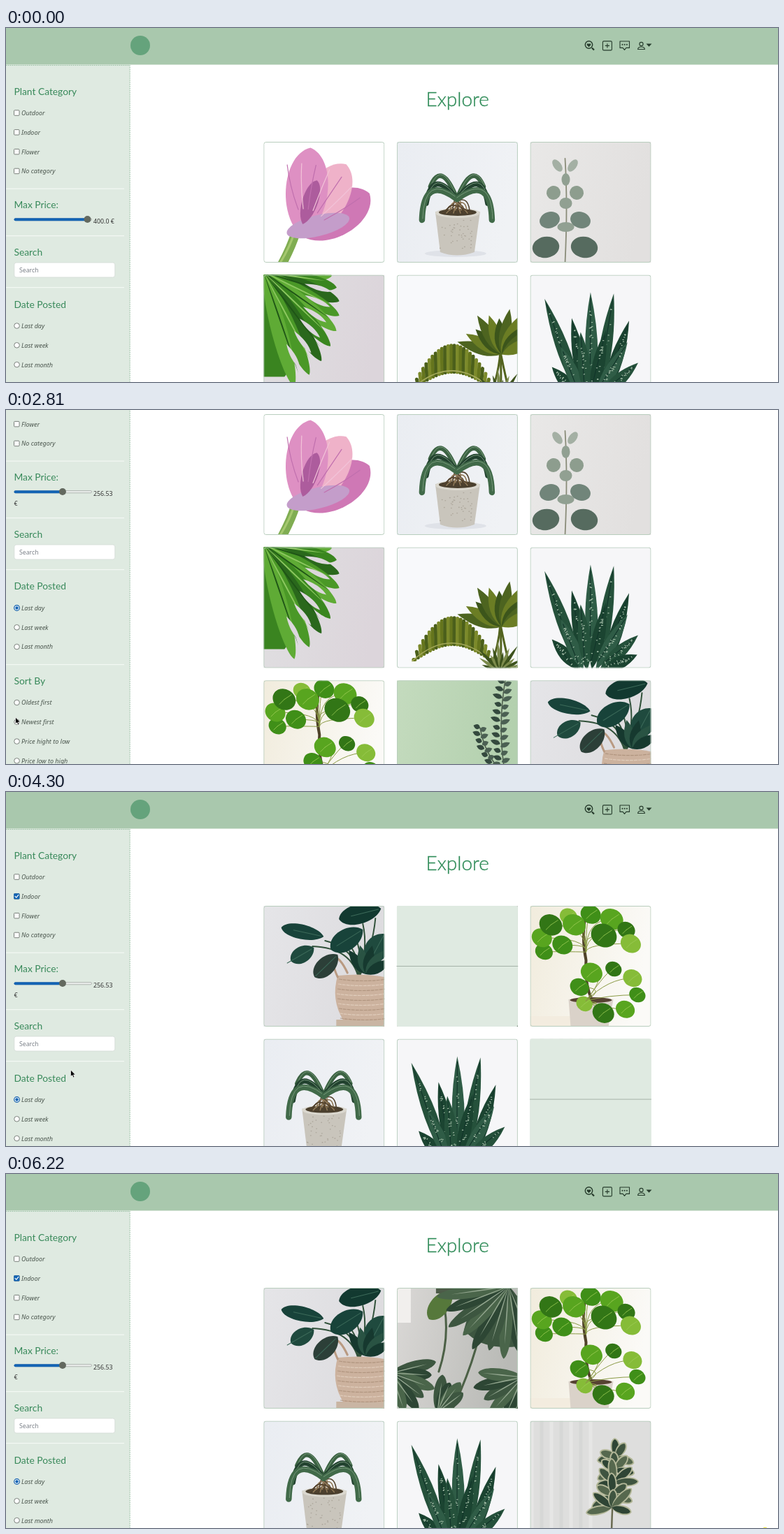
An HTML page that plays this animation: 1104x507 px, repeating every 6260 ms.

```html
<!DOCTYPE html>
<html lang="en">
<head>
<meta charset="utf-8">
<title>Explore plants</title>
<style>
html, body { margin: 0; height: 100%; overflow: hidden; background: #fff; }
#stage { display: block; width: 1104px; height: 507px; }
.h { font: 400 13.8px Lato, sans-serif; fill: #38895a; }
.title { font: 300 28px Lato, sans-serif; fill: #2e8b57; stroke: #2e8b57; stroke-width: .35px; text-anchor: middle; }
.label { font: italic 9px "Noto Sans", sans-serif; fill: #4a554d; }
.val { font: 8.8px "Noto Sans", sans-serif; fill: #333; }
.hint { font: 8.7px "Noto Sans", sans-serif; fill: #7b8088; }
.button { font: 8.7px "Noto Sans", sans-serif; fill: #38895a; text-anchor: middle; }
.card { font: 11.1px "Liberation Sans", Arial, sans-serif; fill: #38895a; text-anchor: middle; }
.icon { fill: none; stroke: #263b2c; stroke-width: 1.1; }
</style>
</head>
<body>
<svg id="stage" viewBox="0 0 1104 507"></svg>
<script>
const LOOP = 6260, WRAP = 14, SIZE = 173, PITCH = 190.6;
const PALE = '#dfeae1', BLUE = '#1464b4', GREEN = '#38895a';

// ---- drawing helpers: each returns SVG markup ----
const times = (n, fn) => Array.from({ length: n }, (_, i) => fn(i)).join('');
const each = (list, fn) => list.map(fn).join('');
const rect = (x, y, w, h, fill, more = '') => `<rect x="${x}" y="${y}" width="${w}" height="${h}" fill="${fill}" ${more}/>`;
const oval = (x, y, rx, ry, turn, fill) => `<ellipse rx="${rx}" ry="${ry}" fill="${fill}" transform="translate(${x} ${y}) rotate(${turn})"/>`;
const dot = (x, y, r, fill, more = '') => `<circle cx="${x}" cy="${y}" r="${r}" fill="${fill}" ${more}/>`;
const shape = (d, fill) => `<path d="${d}" fill="${fill}"/>`;
const line = (d, color, w = 1, more = '') => `<path d="${d}" fill="none" stroke="${color}" stroke-width="${w}" stroke-linecap="round" ${more}/>`;
const text = (x, y, cls, str) => `<text x="${x}" y="${y}" class="${cls}">${str}</text>`;
const place = (x, y, turn, body) => `<g transform="translate(${x} ${y}) rotate(${turn})">${body}</g>`;
const ground = fill => rect(0, 0, SIZE, SIZE, fill);
const fade = (id, a, b) => `<linearGradient id="${id}" x2="1" y2=".2"><stop stop-color="${a}"/><stop offset="1" stop-color="${b}"/></linearGradient>`;
let seed = 7;
const rnd = (lo = 0, hi = 1) => lo + (hi - lo) * (seed = seed * 16807 % 2147483647) / 2147483647;

const leaf = (len, w, fill) => shape(`M0 0Q${len * .4} ${-w} ${len} 0Q${len * .4} ${w} 0 0`, fill);
const petal = (len, w, fill) => shape(`M0 0C${len * .2} ${-w} ${len * .9} ${-w} ${len} 0C${len * .9} ${w} ${len * .2} ${w} 0 0`, fill);
// n blades turning by a fixed step, cycling through the colours
const fan = (x, y, from, step, n, len, w, colors, blade = leaf) =>
  times(n, i => place(x, y, from + i * step, blade(len(i), w, colors[i % colors.length])));

// ---- plants, each on a 173 px square ----
const plants = {
  tulip: () => ground('#fff')
    + line('M26 176Q40 150 46 130', '#80ad52', 13)
    + line('M24 173Q38 150 44 130', '#a5c86f', 3)
    + fan(56, 136, -33, -26, 3, i => 114 + i * 7, 40, ['#cf78b5', '#efb2c9', '#de90c3'], petal)
    + oval(78, 120, 46, 15, -14, '#c49dca')
    + place(56, 118, -72, petal(66, 15, '#ad5c9d'))
    + times(7, i => place(58, 130, -104 + i * 12, line(`M34 0Q66 ${-4 + i} ${100 - i} 0`, i % 2 ? '#f2c3d8' : '#c06fae', 1.2))),

  orchid: () => ground('url(#cool)')
    + oval(84, 160, 44, 5, 0, '#dfe2e8')
    + shape('M55 100H119L111 158Q86 167 62 158Z', '#c9c5bc')
    + oval(87, 102, 32, 7, 0, '#dad7ce') + oval(87, 101, 27, 5, 0, '#4a3f2e')
    + times(40, () => oval(rnd(62, 110), rnd(110, 156), 1, .8, 0, '#ada79c'))
    + times(9, i => line(`M${66 + i * 5} 102Q${100 - i * 3} ${66 + i % 3 * 8} ${104 - i * 4} 98`, i % 2 ? '#8f7857' : '#54432e', 1.6))
    + each([-1, 1], s => times(3, k =>
      line(`M86 82Q${86 + s * (22 + k * 13)} ${26 + k * 10} ${86 + s * (38 + k * 6)} ${64 + k * 24}`, ['#3c6343', '#22422f', '#416a49'][k], 6.5 + k)
      + line(`M86 80Q${87 + s * (22 + k * 13)} ${24 + k * 10} ${87 + s * (38 + k * 6)} ${62 + k * 24}`, '#7d9e80', .9))),

  eucalyptus: () => ground('url(#grey)')
    + line('M50 173Q54 90 50 24', '#8a8c79', 1.8)
    + times(3, i => oval(51, 54 + i * 34, 6 + i * 3, 9 - i, 0, '#91a092'))
    + times(4, i => each([-1, 1], s =>
      oval(50 + s * (11 + i * 5.5), 34 + i * 39, 5.5 + i * 4.6, 10 - i + i * i * .9, s * (36 - i * 9), ['#a4b0a4', '#8d9d8e', '#71857a', '#566b5f'][i]))),

  monstera: () => ground('url(#mauve)')
    + shape('M0 0H88Q90 70 30 146H0Z', '#3a8420')
    + fan(0, -4, 3, 9, 9, i => 98 + i * 9, 15, ['#5fab35', '#3a861f', '#2a681c', '#4a9827'], petal)
    + fan(0, -4, 8, 9, 8, i => 90 + i * 9, 2, ['#8dc860', '#1f5516'])
    + times(6, i => place(97 - i * i * 1.8, 24 + i * 22, 196 + i * 9, leaf(40, 7, '#dcd7dc'))),

  palm: () => ground('#f8f9fb')
    + times(3, i => line(`M${134 + i * 14} 173Q${146 + i * 4} 140 148 110`, '#53631f', 3))
    + fan(150, 114, -164, 14, 11, i => 66 - i % 3 * 7, 17, ['#4d6420', '#6b7d24', '#3c551b'])
    + times(26, i => {
      const u = i / 25, rise = Math.sin(Math.PI * u);
      return line(`M${26 + 108 * u} ${161 - 22 * rise}L${24 + 112 * u} ${161 - 60 * rise ** .8}`, ['#65751d', '#4b5f1b', '#7c8a2b'][i % 3], 5);
    })
    + line('M22 163Q78 112 134 162', '#a3a85a', 1.5)
    + fan(148, 178, -160, 13, 12, i => 28 + i % 3 * 8, 5, ['#3d521d', '#7c8b4c']),

  aloe: () => {
    const blade = (x, turn, len, fill) => place(x, 175, turn, leaf(len, 18, fill) + line(`M12 -3L${len - 8} 0`, '#12352a', 1.2)
      + times(22, () => { const u = rnd(.08, .85); return oval(len * u, rnd(-6, 6) * (1 - u), 1.3, .6, 80, '#a7c0aa'); }));
    const tones = ['#25513b', '#1b4431', '#2f5c46'];
    return ground('#f6f6f8')
      + times(5, i => blade(72 + i * 8.5, -110 + i * 9.5, 150 - 35 * (i % 3 === 1), tones[i % 3]))
      + times(7, i => blade(70 + i * 6, -132 + i * 18, 58 + 40 * Math.sin(i * .55), tones[(i + 1) % 3]));
  },

  pilea: () => {
    const disc = (x, y, r, fill) => oval(x, y, r, r * .86, 30, fill) + line(`M${x} ${y}l${r * .6} ${-r * .4}m${-r * .6} ${r * .4}l${-r * .4} ${r * .4}`, '#9dcc56', .8);
    const tones = ['#3f8f18', '#58a51f', '#327616', '#86bc38'];
    const ring = (x, y, rx, ry, from, step, n, r) => times(n, i => {
      const a = (from + i * step) * Math.PI / 180;
      const px = x + rx * Math.cos(a), py = y + ry * Math.sin(a);
      return line(`M${px} ${py}Q${x} ${py} 80 ${y + 14}`, '#8a9a45', 1) + disc(px, py, r + i % 3 * 2, tones[i % 4]);
    });
    return ground('url(#cream)') + rect(0, 158, 60, 15, '#f3ecdf')
      + shape('M55 134Q88 128 119 134L112 173H58Z', '#dad2c9') + oval(87, 135, 30, 4, 0, '#564232')
      + line('M88 134Q78 112 80 78Q72 40 82 0', '#4f4229', 4)
      + ring(80, 52, 64, 40, 160, 29, 8, 13) + ring(74, 46, 32, 20, 150, 100, 3, 15)
      + ring(112, 122, 42, 32, 10, 45, 8, 12);
  },

  branch: () => {
    const pair = (x, y, len) => each([-1, 1], s => place(x, y + s * 2, s > 0 ? -22 : 200, leaf(len, 7, s > 0 ? '#4b6053' : '#34493e')));
    return ground('url(#mint)')
      + line('M155 0Q140 90 164 173M119 68Q126 110 158 140', '#4d5e4c', 1.6)
      + times(16, i => pair(154 - 10 * Math.sin(i / 5) + i * .5, 5 + i * 11, 11 + i % 3 * 2))
      + times(7, i => pair(119 + i * i * .7, 70 + i * 10, 10 + i % 2 * 2));
  },

  basket: () => ground('url(#haze)')
    + rect(104, 163, 69, 10, '#c9b5a3')
    + times(6, i => line(`M136 104Q${126 + i * 6} 60 ${70 + i * 18} ${58 - i * 8}`, '#31513a', 2))
    + shape('M106 100Q142 96 173 102V164H114Q96 134 106 100Z', '#ccb29e')
    + times(9, i => line(`M${105 + Math.abs(i - 3)} ${105 + i * 7}q34 5 68 0`, i % 2 ? '#e0cdbc' : '#b0957f', 1.2, 'stroke-dasharray="4 2"'))
    + line('M106 102C92 72 104 62 120 96', '#b99a82', 3)
    + each([[86, 44, 192], [72, 60, 150], [106, 70, 136], [168, 4, 166], [142, 34, 148], [173, 40, 118]], ([x, y, turn], i) =>
      place(x, y, turn, petal(i === 1 ? 38 : 62 - i % 3 * 8, 14 + i * 1.6, ['#18433a', '#1f4a3e', '#2c3f38', '#123930'][i % 4]) + line('M4 0H44', '#3c6a59')))
    + fan(146, 98, -125, 24, 5, () => 42, 15, ['#16392f', '#295343']),

  fern: () => ground('url(#silver)')
    + times(7, f => line(`M122 95Q${80 + f * 14} ${8 + f % 2 * 18} ${70 + f * 18} ${80 - f * 2}`, '#2f4737', 1.5)
      + times(9, i => place(82 + f * 10 + i * 5, 44 + Math.abs(i - 3) * 5 + f % 3 * 7, 100 - f * 12, leaf(9, 5, f % 2 ? '#3b5544' : '#22392d')))),

  sprout: () => ground('#d9dadb')
    + times(6, i => line(`M114 110L${98 + i * 7} ${76 + i % 2 * 6}`, '#64823d') + oval(98 + i * 7, 75 + i % 3 * 5 - i, 6.5, 3.6, -12, '#66983a')),

  bouquet: () => ground('#5590a6')
    + fan(100, 114, -155, 13, 10, i => 58 + i % 2 * 14, 8, ['#334c2e', '#56743d'])
    + times(6, i => {
      const x = 66 + i * 12, y = 34 - 12 * Math.sin(i * .63) + i % 2 * 5;
      return line(`M${x} ${y}Q${x} 60 100 110`, '#6c8a48', 2)
        + fan(x, y + 14, -108, 18, 3, () => 30, 8, ['#f3cdce', '#e6b0b8'], petal);
    }),

  swiss: () => {
    const green = ['#3d5640', '#2d4634', '#4a654a'];
    const frond = (x, y, from, step, n, len) => fan(x, y, from, step, n, i => len - i % 2 * 8, 12, green, petal)
      + fan(x, y, from, step, n, () => len * .8, 1.6, ['#93a68f']);
    return ground('url(#wall)') + rect(0, 0, 20, 50, '#f1efed')
      + line('M122 0Q132 60 80 173M62 0Q80 60 60 120', '#4c6046', 3)
      + place(78, 4, 128, petal(52, 18, '#56783b')) + rect(56, 0, 60, 8, '#4d5b48')
      + shape('M112 6Q150 -4 173 12V84Q120 90 96 60Z', green[0])
      + frond(160, -2, 68, 13, 9, 104)
      + frond(-8, 122, -14, 17, 6, 66) + frond(58, 178, -82, 15, 4, 54) + frond(180, 128, 96, 18, 6, 72);
  },

  rubber: () => ground('#dededd')
    + times(7, i => rect(i * 14, 0, 5, SIZE, i % 2 ? '#d6d7d6' : '#e6e6e5'))
    + line('M116 173Q118 100 123 32', '#696a50', 2.5)
    + times(5, k => times(5, i => {
      const turn = -200 + i * 52 + rnd(-14, 14), len = rnd(24, 30 + k * 3);
      return place(123 - k * 1.5, 52 + k * 18, turn, petal(len, 9, '#b4b899') + petal(len - 2, 6.5, ['#3f5440', '#56684e', '#2f4535'][(i + k) % 3]));
    })),
};

// ---- page parts ----
const cardX = i => 368.3 + i % 3 * PITCH, cardY = i => 163 + Math.floor(i / 3) * PITCH;
const card = (name, i) => `<svg x="${cardX(i)}" y="${cardY(i)}" width="${SIZE}" height="${SIZE}">${plants[name]()}${
  rect(.5, .5, SIZE - 1, SIZE - 1, 'none', 'rx="3" stroke="#b8cdbd"')}</svg>`;
const cover = (id, i, name, price) => `<g id="${id}" transform="translate(${cardX(i)} ${cardY(i)})">${rect(0, 0, SIZE, SIZE, PALE, 'rx="2"')}${
  name ? text(86.5, 77.5, 'card', name) + text(86.5, 94, 'card', price) : line('M0 86.5H173', '#a5b2a8')}</g>`;
const divider = y => rect(0, y, 169, 1.2, '#f3f8f4');
const box = 'rx="1" stroke="#6c736e" stroke-width=".9"';
const options = (y, names, mark) => each(names, (s, i) => mark(y + i * 27.8) + text(22, y + i * 27.8 + 3.4, 'label', s));
const tick = y => rect(11.5, y - 3.8, 7.5, 7.5, '#fff', box);
const radio = y => dot(15.5, y, 3.8, '#fff', box);
const chosen = (id, y) => `<g id="${id}">${dot(15.5, y, 3.8, '#fff', `stroke="${BLUE}" stroke-width="1.2"`)}${dot(15.5, y, 2.2, BLUE)}</g>`;

const header = rect(0, 0, 1104, 52.5, '#a9c8ad') + dot(192, 25, 14, '#65a37c')
  + '<g class="icon">' + dot(833.5, 24, 5.2, 'none', 'stroke-width="1.4"') + '<path d="M838 28.5l3 3" stroke-width="2.2"/>'
  + rect(853.4, 18.9, 13, 13, 'none', 'rx="1.5"') + '<path d="M859.9 22.3v6.2m-3.1 -3.1h6.2"/>'
  + '<path d="M878 19h13.5v9.4h-4.6l-2.4 3l-2.4 -3h-4.1Z" stroke-linejoin="round"/>'
  + dot(908.5, 23, 2.6, 'none') + '<path d="M903.6 30.5q.2 -3.5 4.9 -3.5t4.9 3.5Z"/></g>'
  + shape('M833.5 27.3l-2.9 -3.1q0 -2.9 2.9 -1.5q2.9 -1.4 2.9 1.5Z', '#263b2c')
  + times(3, i => dot(881.5 + i * 3.2, 23.8, 1, '#263b2c'))
  + shape('M915.5 22.4h8l-4 4.4Z', '#263b2c');

const sidebar = rect(0, 53, 177, 1200, PALE) + line('M0 53.4H177.2V1250', '#96bda0', 1, 'stroke-dasharray="1 2"')
  + text(11.5, 95.5, 'h', 'Plant Category')
  + options(121.6, ['Outdoor', 'Indoor', 'Flower', 'No category'], tick)
  + `<g id="checked">${rect(11.2, 145.2, 8.2, 8.2, BLUE, 'rx="1.2"')}${line('M13 149.4l1.8 1.8l3 -3.8', '#fff', 1.2)}</g>`
  + divider(229.6) + text(11.5, 258, 'h', 'Max Price:')
  + rect(12, 272.6, 110.5, 3.2, '#e9ecea', 'rx="1.6" stroke="#a4aaa6" stroke-width=".8"')
  + '<rect id="fill" x="11.5" y="272.2" height="4" rx="2"/>' + dot(0, 274, 5, '#63695f', 'id="thumb"')
  + '<text id="price" x="125" y="279.8" class="val"></text>' + `<g id="euro">${text(11.5, 294, 'val', '€')}</g>`
  + '<g id="lower">' + divider(297) + text(11.5, 326, 'h', 'Search')
  + rect(11.8, 336, 144, 21, '#fff', 'rx="3" stroke="#d3dbd6" stroke-width=".8"') + text(19, 350, 'hint', 'Search')
  + divider(371) + text(11.5, 400.5, 'h', 'Date Posted')
  + options(426.5, ['Last day', 'Last week', 'Last month'], radio) + chosen('day', 426.5)
  + divider(507) + text(11.5, 536, 'h', 'Sort By')
  + options(562, ['Oldest first', 'Newest first', 'Price hight to low', 'Price low to high'], radio) + chosen('sort', 617.6)
  + divider(670) + rect(60.5, 680.3, 47, 24.4, 'none', `rx="4" stroke="${GREEN}" stroke-width="1.3"`)
  + text(84, 696, 'button', 'Search') + '</g>';

const $ = id => document.getElementById(id);
$('stage').innerHTML = '<defs>' + fade('cool', '#eaedf2', '#f0f2f5') + fade('grey', '#e9e8e7', '#e2e0df') + fade('mauve', '#e0dfe1', '#dcd5db')
  + fade('cream', '#f1ecdd', '#fbfaf7') + fade('mint', '#c4dbbe', '#b3d0ae') + fade('haze', '#e5e5e8', '#dddcdf') + fade('silver', '#e4e6e6', '#bfc6c6')
  + fade('wall', '#dad8d6', '#b9bab6') + '</defs><g id="page">' + header + sidebar + text(645.6, 111.5, 'title', 'Explore')
  + '<g id="all">' + each(Object.keys(plants).slice(0, 12), card) + '</g>'
  + '<g id="found">' + each(['basket', 'swiss', 'pilea', 'orchid', 'aloe', 'rubber'], card)
  + cover('wait1', 1) + cover('wait5', 5) + cover('hover0', 0, 'mini monstera,', '26.92€') + cover('hover1', 1, 'monstera,', '24.90€')
  + '</g></g>' + dot(0, 0, 6.5, '#e8df3c', 'id="glow"')
  + '<path id="cursor" d="M0 0V9.6L2.2 7.6L3.8 11L5.4 10.3L3.9 7H6.8Z" stroke="#fff" stroke-width=".7"/>'
  + '<ellipse id="spark" cx="1085.5" cy="508" rx="3" ry="2.2" fill="#f2ea4e"/>';

// ---- motion: each stop is [arrive, leave, ...values], eased from stop to stop ----
const pointer = [[240, 400, 442, 424], [950, 1100, 14, 148], [1670, 1710, 116, 274], [1810, 1870, 74, 274], [2010, 2030, 81, 275],
  [2340, 3050, 13.5, 440], [3390, 3540, 14, 321], [4050, 4090, 83, 380], [4300, 4300, 92.5, 398], [4900, 4960, 420, 236.5],
  [5120, 5360, 600, 235], [5540, 5540, 933, 188], [6000, 6040, 1090, 435]];
const prices = [[0, 1710, 400], [1810, 1870, 228.77], [2010, LOOP, 256.53]];
const scrolls = [[0, 2720, 0], [2810, 2810, 157], [2980, LOOP, 310]];
const clicks = [1080, 2380, 3430, 4040], CLICK = 110;

function at(stops, t) {
  const n = Math.max(0, stops.findLastIndex(s => s[0] <= t));
  const [, leave, ...from] = stops[n], next = stops[n + 1];
  if (!next || t <= leave) return from;
  const u = (t - leave) / (next[0] - leave), e = u * u * (3 - 2 * u);
  return from.map((v, i) => v + (next[i + 2] - v) * e);
}
const show = (id, on) => $(id).setAttribute('opacity', +on);
const move = (id, x, y) => $(id).setAttribute('transform', `translate(${x} ${y})`);
const pulse = (t, from, to) => Math.max(0, Math.min(1, (t - from) / 120, (to + 120 - t) / 120));

function draw() {
  const t = performance.now() % LOOP;
  const [x, y] = at(pointer, t), [price] = at(prices, t);
  const reloaded = t >= 4090, wrapped = price < 400, dragging = t > 1690 && t < 2020;
  const thumbX = 17.3 + price * .248;

  move('page', 0, reloaded ? 0 : -at(scrolls, t)[0]);
  move('lower', 0, wrapped ? WRAP : 0);
  $('price').textContent = wrapped ? price.toFixed(2) : '400.0 €';
  show('euro', wrapped);
  $('thumb').setAttribute('cx', thumbX);
  $('fill').setAttribute('width', thumbX - 11.5);
  $('fill').setAttribute('fill', dragging ? '#2b7cf2' : BLUE);
  show('checked', t >= 1080);
  show('day', t >= 2380);
  show('sort', t >= 3430 && !reloaded);

  show('all', !reloaded);
  show('found', reloaded);
  show('wait1', t < 4600);
  show('wait5', t < 4440);
  show('hover0', pulse(t, 4730, 5000));
  show('hover1', pulse(t, 5020, 5400));

  move('cursor', x, y);
  move('glow', x, y);
  show('cursor', t >= 240 && t < 6040);
  show('glow', dragging || clicks.some(c => t >= c && t < c + CLICK) ? .65 : 0);
  show('spark', t >= 6220);
  requestAnimationFrame(draw);
}
draw();
</script>
</body>
</html>
```
